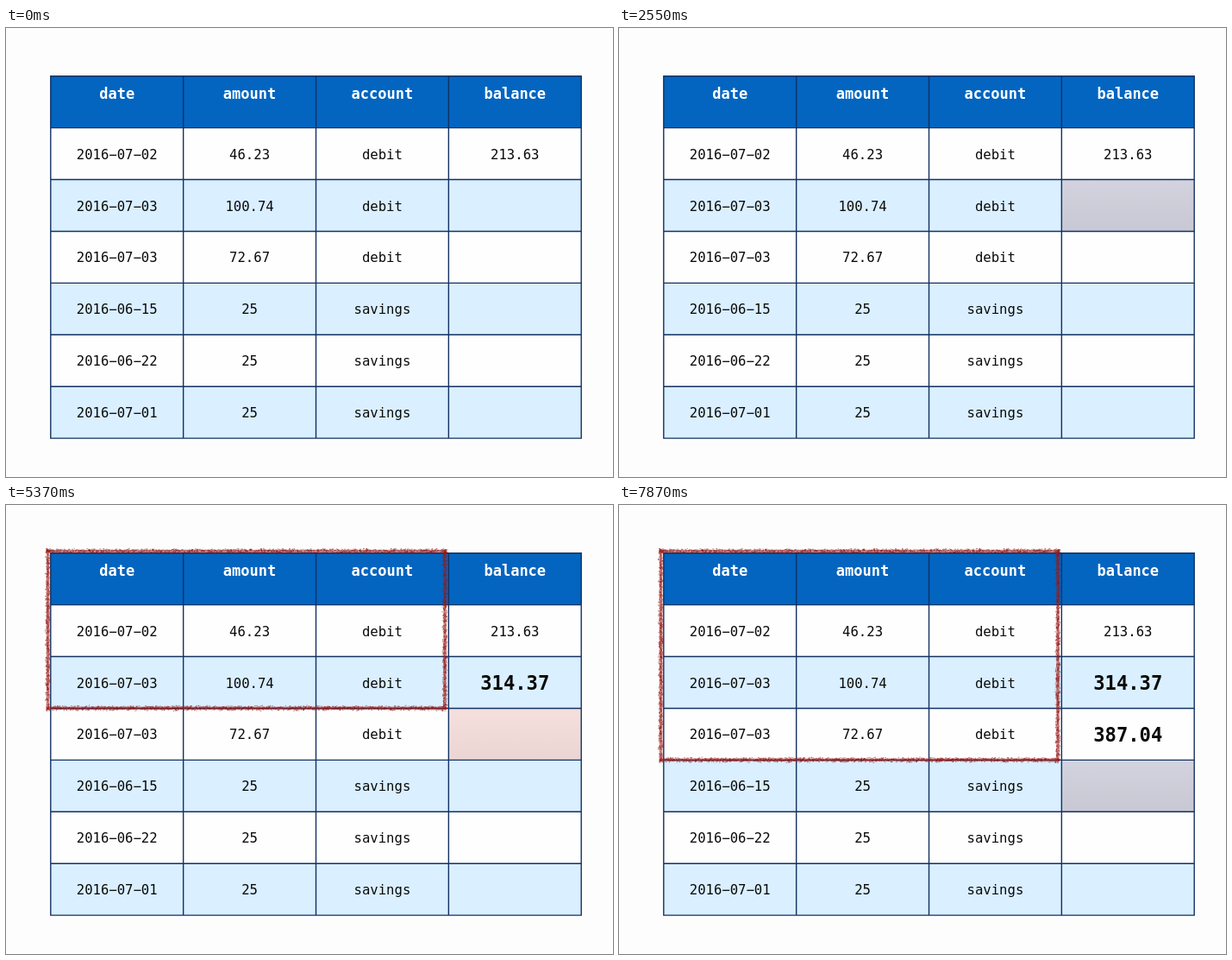
Recreate the animation shown at these times as an HTML page with a canvas. Size 704x520 px, loop 8 s.

```html
<!DOCTYPE html>
<html lang="en">
<head>
<meta charset="utf-8">
<title>Running balance</title>
<style>
html, body { margin: 0; width: 100%; height: 100%; overflow: hidden; background: #fdfdfd; }
svg, canvas { position: absolute; left: 0; top: 0; }
text { font: 15.6px "DejaVu Sans Mono", monospace; text-anchor: middle; fill: #0a0a0a; }
.head { font-weight: bold; font-size: 17px; fill: #fff; }
.big { font-weight: bold; font-size: 22.2px; }
#mark { mix-blend-mode: multiply; }
</style>
</head>
<body>
<svg id="stage" width="704" height="520" viewBox="0 0 704 520">
  <defs>
    <linearGradient id="pink" x2="0" y2="1">
      <stop offset="0" stop-color="#f6e1de"/>
      <stop offset="1" stop-color="#ebd6d4"/>
    </linearGradient>
  </defs>
</svg>
<canvas id="chalk" width="704" height="520"></canvas>
<script>
const LOOP = 8000;
const colX = i => 51.8 + 153.85 * i;
const rowY = i => 55.7 + 59.92 * i;
const rows = [
  ['date', 'amount', 'account', 'balance'],
  ['2016−07−02', '46.23', 'debit', '213.63'],
  ['2016−07−03', '100.74', 'debit', '314.37'],
  ['2016−07−03', '72.67', 'debit', '387.04'],
  ['2016−06−15', '25', 'savings', ''],
  ['2016−06−22', '25', 'savings', ''],
  ['2016−07−01', '25', 'savings', '']
];

// mark: highlighted row, frame: last framed row, sums: results revealed
const steps = [
  { at: 0, mark: 0, frame: 0, sums: 0 },
  { at: 600, mark: 2, frame: 0, sums: 0 },
  { at: 2700, mark: 2, frame: 2, sums: 0 },
  { at: 3300, mark: 2, frame: 2, sums: 1 },
  { at: 4100, mark: 3, frame: 2, sums: 1 },
  { at: 5400, mark: 3, frame: 3, sums: 1 },
  { at: 6750, mark: 3, frame: 3, sums: 2 },
  { at: 7600, mark: 4, frame: 3, sums: 2 }
];

const stage = document.getElementById('stage');
function add(tag, attrs, label) {
  const el = document.createElementNS(stage.namespaceURI, tag);
  for (const key in attrs) el.setAttribute(key, attrs[key]);
  if (label) el.textContent = label;
  return stage.appendChild(el);
}

rows.forEach((_, r) => add('rect', {
  x: colX(0), y: rowY(r), width: colX(4) - colX(0), height: rowY(1) - rowY(0),
  fill: r === 0 ? '#0365c0' : r % 2 ? '#fefefe' : '#daefff'
}));
const mark = add('rect', {
  id: 'mark', x: colX(3), width: colX(4) - colX(3), height: 60.5, fill: 'url(#pink)'
});
let grid = '';
for (let i = 0; i <= 7; i++) grid += `M${colX(0) - .7} ${rowY(i)}H${colX(4) + .7}`;
for (let i = 0; i <= 4; i++) grid += `M${colX(i)} ${rowY(0)}V${rowY(7)}`;
add('path', { d: grid, stroke: '#123163', 'stroke-width': 1.4, fill: 'none' });

const sums = [];
rows.forEach((row, r) => row.forEach((label, c) => {
  const big = c === 3 && (r === 2 || r === 3);
  const base = r === 0 ? 82 : rowY(r) + (big ? 38.2 : 36);
  const el = add('text', {
    x: colX(c + .5), y: base, class: r === 0 ? 'head' : big ? 'big' : ''
  }, label);
  if (big) sums.push(el);
}));

const ctx = document.getElementById('chalk').getContext('2d');
function random(seed) {
  return () => (seed = seed * 16807 % 2147483647) / 2147483647;
}

function chalkLine(x1, y1, x2, y2, seed) {
  const rnd = random(seed);
  const length = Math.hypot(x2 - x1, y2 - y1);
  ctx.save();
  ctx.translate(x1, y1);
  ctx.rotate(Math.atan2(y2 - y1, x2 - x1));
  ctx.fillStyle = 'rgba(160,32,28,.5)';
  ctx.fillRect(-2, -1.7, length + 4, 3.4);
  ctx.fillStyle = 'rgba(150,25,22,.55)';
  for (let i = 0; i < length * 3.2; i++) {
    const along = rnd() * (length + 5) - 2.5;
    const across = (rnd() + rnd() - 1) * 3.3;
    ctx.fillRect(along, across - .5, .7 + rnd() * 1.2, 1);
  }
  ctx.restore();
}

function drawFrame(last) {
  ctx.clearRect(0, 0, 704, 520);
  if (!last) return;
  const left = 48.6, right = 509, top = 53.5, bottom = rowY(last + 1) - .2;
  chalkLine(left, top, right, top, 11);
  chalkLine(left, top, left, bottom, 207);
  chalkLine(right, top, right, bottom, 3109);
  chalkLine(left, bottom, right, bottom, 40013);
}

let shown;
function tick() {
  const time = performance.now() % LOOP;
  const step = steps.filter(s => s.at <= time).pop();
  if (step !== shown) {
    shown = step;
    mark.setAttribute('visibility', step.mark ? 'visible' : 'hidden');
    mark.setAttribute('y', rowY(step.mark));
    sums.forEach((el, i) => el.setAttribute('visibility', i < step.sums ? 'visible' : 'hidden'));
    drawFrame(step.frame);
  }
  requestAnimationFrame(tick);
}
tick();
</script>
</body>
</html>
```
